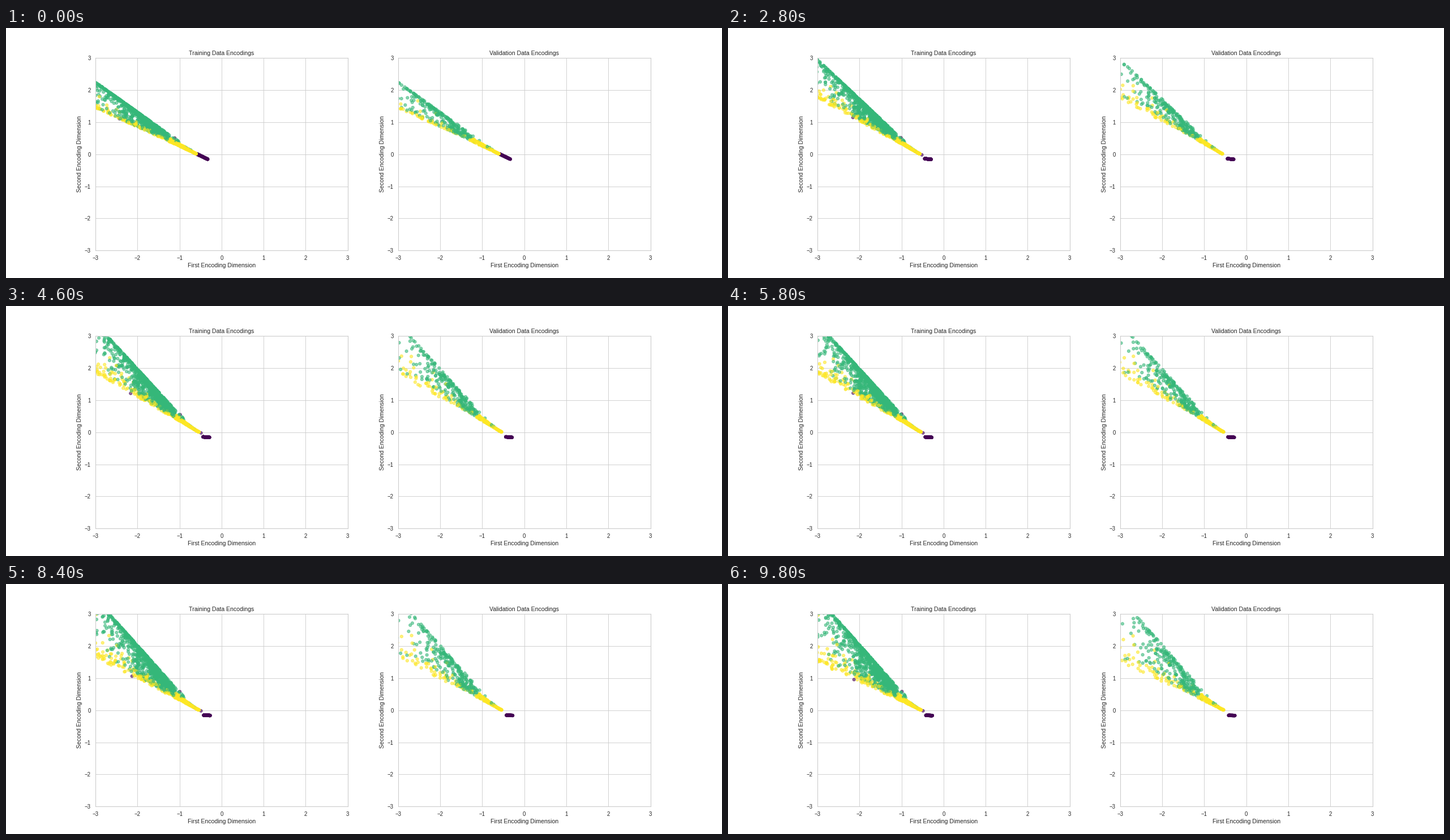
These frames come from a looping animation (1265x443 px, 10000 ms). A matplotlib script:

```python
import numpy as np
import matplotlib.pyplot as plt
from matplotlib.animation import FuncAnimation

FRAMES, INTERVAL = 50, 200
DPI = 63.25
PURPLE, GREEN, YELLOW = "#440154", "#35b779", "#fde725"
INK, LINE = "0.15", "0.8"

plt.rcParams.update({
    "font.family": "Liberation Sans", "font.size": 12,
    "text.color": INK, "axes.labelcolor": INK,
    "xtick.color": INK, "ytick.color": INK,
    "axes.edgecolor": LINE, "axes.linewidth": 1.25,
    "grid.color": LINE, "grid.linewidth": 1.0,
    "axes.grid": True, "axes.axisbelow": True,
    "axes.titlesize": 12, "axes.labelsize": 12,
    "xtick.labelsize": 11, "ytick.labelsize": 11,
    "xtick.major.size": 6, "ytick.major.size": 6,
    "xtick.bottom": False, "ytick.left": False,
})


def ease(t):
    t = np.clip(t, 0, 1)
    return t * t * (3 - 2 * t)


def fan_shape(i):
    """Tip position and the slopes of both edges of the fan."""
    opened = ease(i / 24)
    dip = np.exp(-((i - 7) / 4) ** 2)
    tip = (-0.6 + 0.06 * opened - 0.1 * dip, 0.01 + 0.07 * dip)
    steep = 0.93 + 0.53 * opened
    shallow = 0.6 + 0.16 * np.sin(np.pi * i / (FRAMES - 1))
    return tip, steep, shallow, 0.1 * opened


class Cloud:
    """Points placed by distance r from the tip and height v between edges."""

    def __init__(self, ax, seed, green, near, far, purple, lean, loose, strays):
        rng = np.random.default_rng(seed)
        few = green // 40

        # Green: crowded to the upper edge, more so far from the tip
        r_green = 0.5 + rng.gamma(2.1, 0.4, green)
        power = lean * np.interp(r_green, [0.7, 1.1, 1.6], [1.2, 2.0, 3.0])
        v_green = 1 - 0.92 * rng.random(green) ** power
        r_few = rng.uniform(0.1, 0.5, few)
        v_few = rng.uniform(0.4, 1.05, few)

        # Yellow: a dense tip and a trail along the lower edge
        r_near = 0.56 * rng.random(near) ** 1.15
        v_near = 0.5 * rng.random(near)
        r_far = rng.uniform(0.45, 2.5, far)
        v_far = 0.25 * rng.random(far) ** 1.5
        v_far += (rng.random(far) < loose) * rng.uniform(0, 0.6, far)

        r = np.concatenate([r_green, r_few, r_near, r_far])
        v = np.concatenate([v_green, v_few, v_near, v_far])
        colors = np.repeat([GREEN, YELLOW], [green + few, near + far])
        order = rng.permutation(len(r))
        stray_r, stray_v = np.reshape(strays, (-1, 2)).T
        self.r = np.concatenate([stray_r, r[order]])
        self.v = np.concatenate([stray_v, v[order]])
        self.phase = rng.uniform(0, 2 * np.pi, (2, len(self.r)))
        self.rate = rng.uniform(0.3, 0.9, (2, len(self.r)))
        self.u = rng.random(purple)

        shades = [PURPLE] * (purple + len(strays)) + list(colors[order])
        self.dots = ax.scatter(*np.zeros((2, len(shades))), s=36, c=shades,
                               alpha=0.6, linewidths=1)

    def fan(self, i):
        (tip_x, tip_y), steep, shallow, bend = fan_shape(i)
        sway = np.sin(self.rate * i + self.phase)
        r = self.r * (1.15 - 0.15 * ease(i / 14)) * (1 + 0.015 * sway[0])
        v = self.v + 0.02 * sway[1] * (1 - self.v)
        # Early on the far end parts into two branches
        part = 0.13 * (1 - ease(i / 18)) * np.clip((r - 0.9) / 0.8, 0, 1)
        v = v - part * np.sin(2 * np.pi * v)
        low = shallow * r
        high = steep * r * np.abs(r) / (np.abs(r) + bend + 1e-6)
        y = tip_y + (low + (high - low) * v) * (1 + 0.02 * np.sin(2.1 * i))
        return np.column_stack([tip_x - r, y])

    def cluster(self, i):
        s, folded = i / (FRAMES - 1), ease(i / 7)
        left = np.array([-0.59 + 0.13 * folded + 0.04 * s,
                         0.01 - 0.14 * folded - 0.03 * s])
        right = np.array([-0.33 + 0.06 * np.sqrt(s), -0.155 - 0.01 * s])
        return left + (right - left) * self.u[:, None]

    def update(self, i):
        self.dots.set_offsets(np.vstack([self.cluster(i), self.fan(i)]))
        return self.dots


fig, axes = plt.subplots(1, 2, figsize=(1265 / DPI, 443 / DPI), dpi=DPI)
for ax, name in zip(axes, ("Training", "Validation")):
    ax.set(title=f"{name} Data Encodings", xlim=(-3, 3), ylim=(-3, 3),
           xlabel="First Encoding Dimension",
           ylabel="Second Encoding Dimension")

clouds = [
    Cloud(axes[0], 11, green=850, near=300, far=130, purple=260,
          lean=1, loose=0.12, strays=[(1.6, 0), (0.45, 1.1), (-0.05, 0.5)]),
    Cloud(axes[1], 23, green=260, near=150, far=70, purple=120,
          lean=0.7, loose=0.25, strays=[]),
]


def draw(i):
    return [cloud.update(i) for cloud in clouds]


anim = FuncAnimation(fig, draw, frames=FRAMES, interval=INTERVAL,
                     init_func=lambda: draw(0), repeat=True, repeat_delay=0)
plt.show()
```
